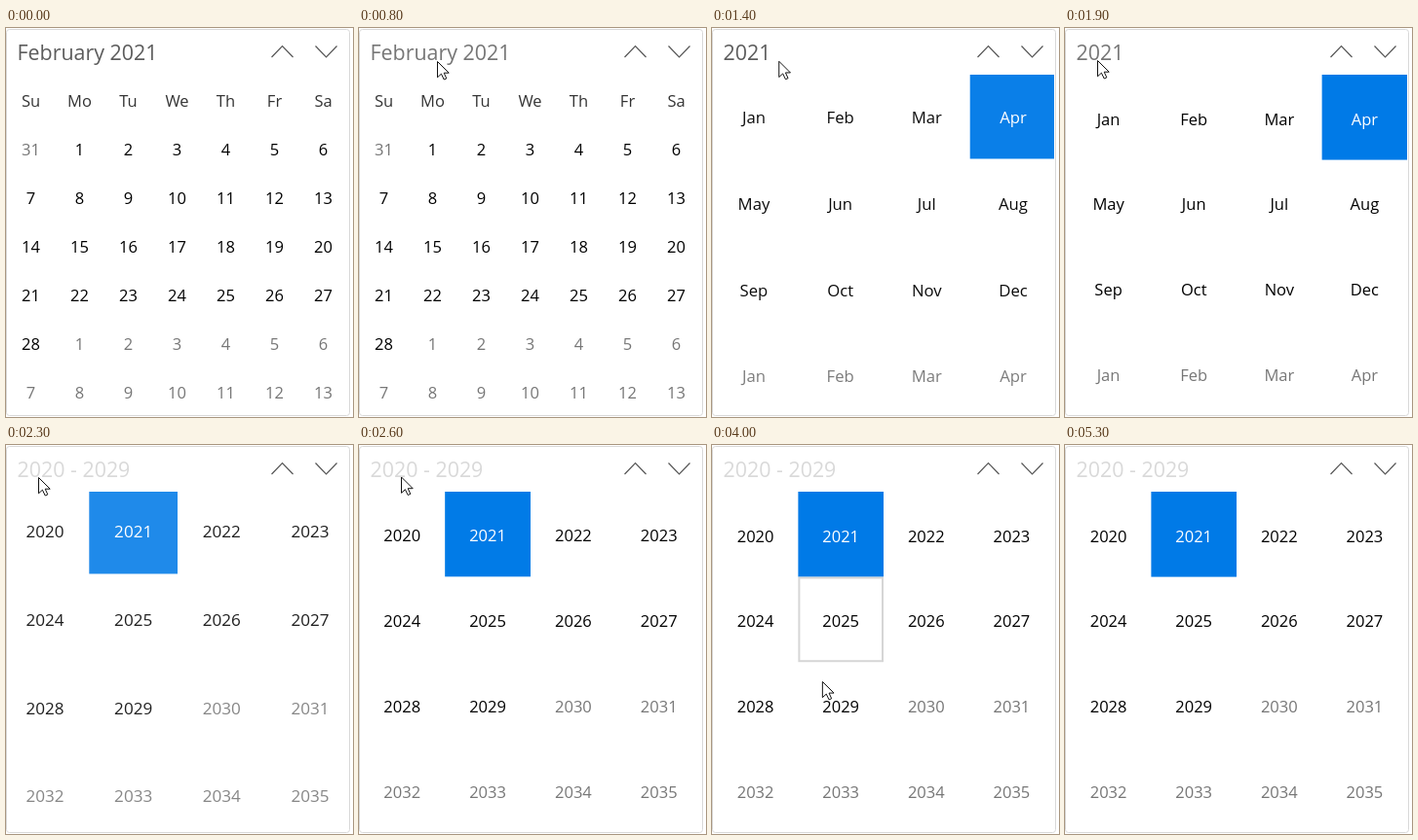
Recreate the animation shown at these times as an HTML page. Size 356 px wide and 400 px high, loop 5.5 s.

```html
<!DOCTYPE html>
<html lang="en">
<head>
<meta charset="utf-8">
<title>Calendar view</title>
<style>
  html, body { margin: 0; width: 100%; height: 100%; overflow: hidden; background: #fff; }
  svg { display: block; width: 356px; height: 400px; }
  text { font: 16.5px "Open Sans", "Noto Sans", sans-serif; text-anchor: middle; fill: #000; }
  #title { font-size: 21.4px; text-anchor: start; }
  .muted { fill: #767676; }
  .head { fill: #333; }
  .picked { fill: #fff; }
  .chevron { fill: none; stroke: #555; stroke-width: 1.2; }
  #hover { fill: none; stroke: #d6d6d6; stroke-width: 2; }
</style>
</head>
<body>
<svg viewBox="0 0 356 400">
  <clipPath id="body"><rect x="1" y="48" width="350" height="350.5"/></clipPath>
  <rect x=".5" y="1.5" width="352" height="397" rx="3" fill="#fff" stroke="#d9d9d9"/>
  <text id="title" x="11.5" y="32.7"></text>
  <path class="chevron" d="M272.5 30 283.5 18.5 294.5 30M317.5 18.5 328.5 30 339.5 18.5"/>
  <g clip-path="url(#body)">
    <g id="month"></g>
    <g id="year"></g>
    <g id="decade"></g>
    <rect id="hover"/>
  </g>
  <path id="cursor" d="M-.5 .5V16.8L3.4 13.2 6.2 19 8.8 17.9 6.2 12.2H11.2Z" fill="#fff" stroke="#111"/>
</svg>
<script>
const LOOP = 5500, STEP = 100;
const CELL = 87.6, LEFT = .8, TOP = 48;
const $ = id => document.getElementById(id);
const clamp = n => Math.min(1, Math.max(0, n));

function setAttrs(el, attrs) {
  for (const key in attrs) el.setAttribute(key, attrs[key]);
}

function add(parent, tag, attrs, text = '') {
  const el = document.createElementNS('http://www.w3.org/2000/svg', tag);
  setAttrs(el, attrs);
  el.textContent = text;
  parent.append(el);
}

function buildMonth() {
  const column = i => 25.5 + 50 * (i % 7);
  'Su Mo Tu We Th Fr Sa'.split(' ').forEach((name, i) =>
    add($('month'), 'text', { x: column(i), y: 81, class: 'head' }, name));
  for (let i = 0; i < 42; i++) {
    const inside = i > 0 && i < 29;
    const day = i === 0 ? 31 : inside ? i : i - 28;
    add($('month'), 'text',
      { x: column(i), y: 131 + 50 * Math.floor(i / 7), class: inside ? '' : 'muted' }, day);
  }
}

const cellBox = (column, row, inset = 0) => ({
  x: LEFT + CELL * column + inset, y: TOP + CELL * row + inset,
  width: CELL - 2 * inset, height: CELL - 2 * inset
});

function buildGrid(parent, labels, picked, firstMuted) {
  labels.forEach((label, i) => {
    const box = cellBox(i % 4, Math.floor(i / 4));
    if (i === picked) add(parent, 'rect', { ...box, fill: '#007ae7' });
    const kind = i === picked ? 'picked' : i >= firstMuted ? 'muted' : '';
    add(parent, 'text', { x: box.x + CELL / 2, y: box.y + 51.7, class: kind }, label);
  });
}

const months = 'Jan Feb Mar Apr May Jun Jul Aug Sep Oct Nov Dec'.split(' ');
buildMonth();
buildGrid($('year'), [...months, ...months.slice(0, 4)], 3, 12);
buildGrid($('decade'), Array.from({ length: 16 }, (_, i) => 2020 + i), 1, 10);

const views = [
  { id: 'month', title: 'February 2021', open: -LOOP, close: 1080 },
  { id: 'year', title: '2021', open: 1080, close: 2100 },
  { id: 'decade', title: '2020 - 2029', open: 2100, close: Infinity }
];

// A view shrinks into place as it opens, then drops back as the next one comes.
function pose({ open, close }, time) {
  if (time < open) return [1, 0];
  const rest = .42 ** ((time - open) / 100);
  const leaving = clamp((time - close + 100) / 150);
  return [1 + .2 * rest - .1 * leaving, (1 - .7 * rest) * (1 - leaving)];
}

function titleColor({ close }, time) {
  if (close === Infinity) return '#d9d9d9';
  const pressed = time >= close - 280;
  return pressed ? '#767676' : '#5c5c5c';
}

// Pointer stops; power bends the way from the stop before.
const stops = [
  { t: 0, x: 328, y: 441 }, { t: 200, x: 328, y: 285 }, { t: 300, x: 157, y: 147 },
  { t: 400, x: 92, y: 66 }, { t: 600, x: 81, y: 34 }, { t: 1300, x: 81, y: 34 },
  { t: 1700, x: 34, y: 33 }, { t: 2500, x: 34, y: 33 }, { t: 2700, x: 54, y: 32 },
  { t: 3300, x: 66, y: 24 }, { t: 3500, x: 66, y: 24 }, { t: 4200, x: 133, y: 453, power: 2 }
];

function pointerAt(time) {
  const next = stops.findIndex(stop => stop.t > time);
  if (next < 0) return stops.at(-1);
  const a = stops[Math.max(0, next - 1)], b = stops[next];
  const p = clamp((time - a.t) / (b.t - a.t));
  return { x: a.x + (b.x - a.x) * p, y: a.y + (b.y - a.y) * p ** (b.power || 1) };
}

// The outline trails the pointer by one step.
function drawHover(view, time) {
  const { x, y } = pointerAt(time - STEP);
  const shown = view.id === 'decade' && y > TOP && y < 400;
  $('hover').style.display = shown ? '' : 'none';
  setAttrs($('hover'),
    cellBox(Math.floor((x - LEFT) / CELL), Math.floor((y - TOP) / CELL), 1));
}

function draw() {
  const time = Math.floor(performance.now() % LOOP / STEP) * STEP;
  const view = views.findLast(v => v.open <= time);

  $('title').textContent = view.title;
  $('title').style.fill = titleColor(view, time);

  for (const v of views) {
    const [scale, opacity] = pose(v, time);
    setAttrs($(v.id), {
      transform: `translate(176 224) scale(${scale}) translate(-176 -224)`, opacity
    });
  }

  drawHover(view, time);
  const { x, y } = pointerAt(time);
  $('cursor').setAttribute('transform', `translate(${x} ${y})`);
  requestAnimationFrame(draw);
}
draw();
</script>
</body>
</html>
```
